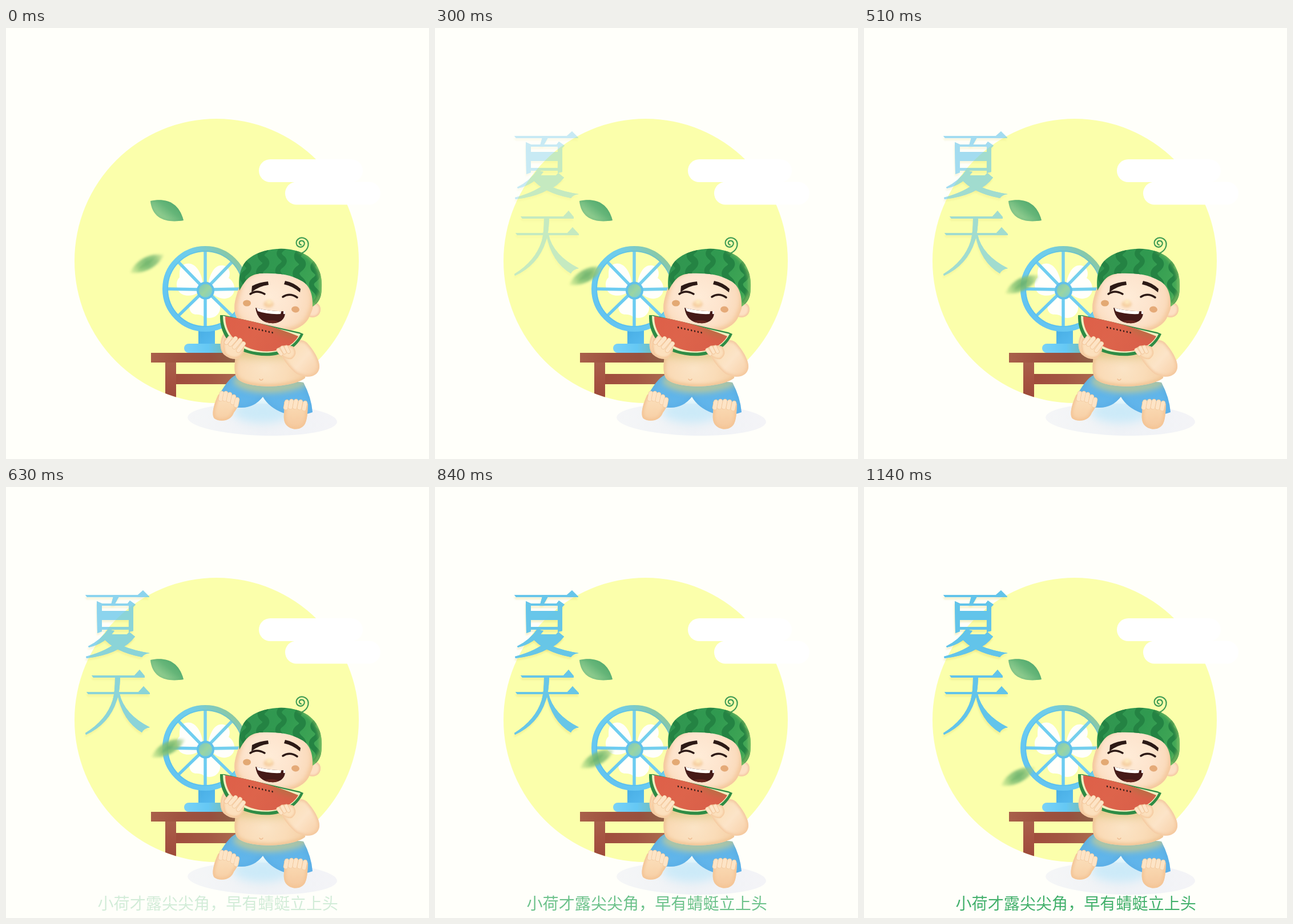
Recreate the animation shown at these times as an HTML page with a canvas. Size 741 px wide and 755 px high, loop 1170 ms.

```html
<!DOCTYPE html>
<html lang="zh-CN">
<head>
<meta charset="utf-8">
<title>夏天</title>
<style>
  html, body { margin: 0; width: 100%; height: 100%; overflow: hidden; background: #fffffa; }
  canvas { display: block; }
</style>
</head>
<body>
<canvas id="stage" width="741" height="755" role="img" aria-label="夏天 小荷才露尖尖角，早有蜻蜓立上头"></canvas>
<script>
const W = 741, H = 755, LOOP = 1170, STEP = 30;
const stage = document.getElementById('stage').getContext('2d');
let c;

function layer(draw) {
  const canvas = document.createElement('canvas');
  canvas.width = W;
  canvas.height = H;
  c = canvas.getContext('2d');
  draw();
  return canvas;
}

function stops(gradient, colors) {
  colors.forEach((color, i) => gradient.addColorStop(i / (colors.length - 1), color));
  return gradient;
}
const linear = (x1, y1, x2, y2, ...colors) => stops(c.createLinearGradient(x1, y1, x2, y2), colors);
const radial = (x, y, r, ...colors) => stops(c.createRadialGradient(x, y, 0, x, y, r), colors);

function fill(d, paint) {
  const path = new Path2D(d);
  c.fillStyle = paint;
  c.fill(path, 'evenodd');
  return path;
}

function line(d, paint, width) {
  c.strokeStyle = paint;
  c.lineWidth = width;
  c.lineCap = c.lineJoin = 'round';
  c.stroke(new Path2D(d));
}

function oval(x, y, rx, ry, paint, turn = 0) {
  c.fillStyle = paint;
  c.beginPath();
  c.ellipse(x, y, rx, ry, turn, 0, Math.PI * 2);
  c.fill();
}

function pill(x, y, w, h, paint) {
  c.fillStyle = paint;
  c.beginPath();
  c.roundRect(x, y, w, h, h / 2);
  c.fill();
}

function ring(x, y, r, width, paint) {
  c.lineWidth = width;
  c.strokeStyle = paint;
  c.beginPath();
  c.arc(x, y, r, 0, Math.PI * 2);
  c.stroke();
}

function inside(path, draw) {
  c.save();
  c.clip(path);
  draw();
  c.restore();
}

function blurred(radius, draw) {
  c.save();
  c.filter = `blur(${radius}px)`;
  draw();
  c.restore();
}

// Fills a shape and shades it softly along its inner edge.
function soft(d, paint, edge, width) {
  const path = fill(d, paint);
  inside(path, () => blurred(width / 3, () => line(d, edge, width)));
  return path;
}

function drawBackdrop() {
  c.fillStyle = '#fffffa';
  c.fillRect(0, 0, W, H);
  oval(369, 408, 249, 249, '#fbffab');
  pill(443, 230, 182, 40, '#fff');
  pill(489, 269.5, 167, 40, '#fff');
}

function drawLeaf() {
  const d = 'M253 303C276 298 302 302 311 337C282 342 256 335 253 303Z';
  soft(d, linear(262, 336, 290, 302, '#a0d392', '#88c88b', '#65b578', '#57ad70'), 'rgba(76,168,108,.25)', 4);
}

function drawTable() {
  const disc = new Path2D();
  disc.arc(369, 408, 249, 0, Math.PI * 2);
  inside(disc, () => {
    fill('M279 585H298V650H279Z', linear(279, 585, 279, 648, '#a9604b', '#a65342', '#9d4a3a'));
    fill('M298 606H412V624H298Z', linear(298, 0, 410, 0, '#a04d3c', '#a35744', '#ad6d4f'));
  });
  fill('M254 569H415V586H254Z', linear(254, 0, 412, 0, '#a9604a', '#9f5240', '#98503e', '#8c6648'));
}

function drawFan() {
  const white = '#fffffb';
  fill('M346 455C344 429 332 409 315 413C301 417 305 430 304 437C295 444 298 465 313 468C325 471 337 466 346 455Z', white);
  fill('M353 455C356 432 365 413 381 416C392 418 394 431 390 438C402 445 404 464 393 471C380 479 364 471 353 455Z', white);
  fill('M344 468C329 471 317 484 323 496C328 505 338 500 344 504C354 512 372 508 375 493C377 479 364 471 355 468Z', white);
  fill('M337 528H366V558H337Z', linear(337, 528, 366, 558, '#48aee5', '#58bcf0'));
  pill(312, 553, 84, 16, linear(312, 0, 396, 0, '#79d2f7', '#65c8f4', '#7cb99f'));

  const blue = linear(300, 500, 400, 390, '#66c8f2', '#72cff0', '#7ccfe3');
  for (let i = 0; i < 8; i++) {
    const angle = i * Math.PI / 4, x = Math.cos(angle), y = Math.sin(angle);
    line(`M${349 + x * 13} ${458 + y * 13}L${349 + x * 67} ${457 + y * 67}`, blue, 5.5);
  }
  ring(349, 457, 70, 10, linear(290, 510, 408, 398, '#62c3f1', '#69cbf2', '#70cde9', '#8fc795'));
  ring(349, 457, 66, 2, 'rgba(70,180,228,.3)');
  oval(349.5, 460, 15.5, 15.5, '#61c1e9');
  oval(349.5, 460, 11.5, 11.5, linear(339, 450, 361, 470, '#7cc8bc', '#9bd5a2', '#7dcfcd'));
}

function drawShadow() {
  oval(449, 686, 131, 28, linear(318, 0, 580, 0, '#f5f6f7', '#eff2f6', '#f4f4f7'), 0.03);
  blurred(8, () => oval(449, 672, 52, 20, 'rgba(190,231,250,.7)'));
}

const SKIN = '#fce0bd', PEACH = '#f4c79b', INK = '#2c1915';

function drawBody() {
  const shorts = 'M404 607C391 613 382 628 371 646Q388 666 413 665Q435 665 450 646Q461 665 485 674Q511 683 537 673Q535 647 521 621Z';
  const cloth = soft(shorts, linear(0, 608, 0, 678, '#6cb9e2', '#60b5ea', '#62b5ec'), 'rgba(77,160,219,.25)', 9);
  inside(cloth, () => blurred(6, () => line('M406 618C430 638 500 634 526 616', 'rgba(196,202,146,.9)', 14)));

  const torso = 'M405 562C399 587 398 608 407 616C428 633 501 631 524 613L528 556Z';
  const path = soft(torso, radial(454, 596, 76, '#fbe4c6', '#fadcb8', '#f5cfa4'), '#f1c697', 8);
  inside(path, () => blurred(8, () => oval(450, 567, 62, 12, 'rgba(212,190,112,.6)')));
  line('M444 615Q447 619 450 615', '#efbd91', 1.5);

  soft('M490 557C506 545 519 544 527 551C540 565 550 583 549 595C546 613 525 614 509 606C495 595 484 579 480 568Z',
    linear(490, 560, 545, 608, '#fadeb5', '#fce4c8', '#f8d0a8'), '#f4c89e', 6);
  soft('M386 529C373 543 373 563 382 572Q393 582 408 579L416 548Z', SKIN, PEACH, 6);
}

function drawFoot(d, toes) {
  soft(d, linear(0, 636, 0, 704, '#fce3c2', '#f9d6ae', '#f5c79c'), '#f4c596', 7);
  toes.forEach(([x, y]) => {
    const toe = `M${x} ${y}l-2 10`;
    line(toe, '#f1c69b', 8.5);
    line(toe, '#fde4c6', 7);
  });
}

function drawFeet() {
  drawFoot('M372 642C365 656 359 677 365 684C377 692 395 687 399 674C407 664 410 653 407 648Z',
    [[378, 640], [385, 640], [392, 642], [399, 646], [405, 651]]);
  drawFoot('M487 655C490 669 483 682 490 694C499 706 518 705 524 693C529 682 528 667 529 658Z',
    [[492, 655], [500, 654], [508, 654], [516, 655], [524, 657]]);
}

function drawFace() {
  soft('M530 483C541 477 552 483 551 494C550 505 539 510 529 505Z', '#fde0c4', '#f5c9a0', 5);
  const head = 'M412 440C407 462 400 474 400 491C401 514 418 526 451 532C495 537 525 526 533 502C545 479 541 440 520 427Q463 401 412 440Z';
  soft(head, radial(462, 472, 85, '#ffecd8', '#fde4cd', '#f9d5b0'), PEACH, 10);

  fill('M430 463L431 452Q444 445 459 444L460 450Q443 452 430 463Z', INK);
  fill('M487 449L489 443Q505 446 516 457L515 463Q502 452 487 449Z', INK);
  line('M428 466Q439 458 453 466', INK, 3.5);
  line('M485 471Q497 463 510 472', INK, 3.5);
  blurred(2, () => {
    oval(460, 484, 9, 6, '#f6cfa2');
    oval(461, 480, 5, 4, '#feeabf');
  });
  blurred(0.7, () => {
    oval(422, 482, 7, 5.5, '#e3a973');
    oval(507, 493, 7, 5.5, '#e5aa78', 0.15);
  });

  const mouth = fill('M437 490Q463 497 489 496Q490 514 471 517Q441 519 437 490Z', '#451a18');
  inside(mouth, () => {
    oval(465, 516, 13, 4, '#652720');
    fill('M438 488Q463 495 483 494L481 501Q458 502 441 496Z', '#fffefa');
    fill('M486 494H491V501H486Z', '#fffefa');
  });
}

function drawCap() {
  const d = 'M409 460C406 434 411 414 428 402C448 387 487 382 514 392C545 403 555 431 553 456C553 472 547 482 537 488C538 469 533 451 518 443C497 430 469 429 444 430C424 433 418 444 409 460Z';
  const cap = fill(d, linear(410, 405, 553, 465, '#319550', '#309a50', '#44a957'));
  inside(cap, () => {
    [[424, 397], [454, 388], [486, 385], [518, 390], [545, 409]].forEach(([x, y], i) => {
      line(`M${x} ${y}q-13 9 -3 17q10 7 -3 16q-9 8 3 18q10 9 1 19`, '#248343', i % 2 ? 12 : 9);
    });
    blurred(3, () => {
      line('M516 389C549 403 556 434 553 465L538 488', 'rgba(150,200,105,.75)', 8);
      line('M409 459C421 432 441 433 470 431', 'rgba(23,99,41,.25)', 4);
    });
  });
  line('M519 394C531 388 533 374 524 369C514 364 505 373 510 381C517 389 528 378 520 373C514 371 511 378 517 380', '#3f9c54', 2.2);
}

function drawSlice() {
  fill('M375 503C374 533 389 557 419 568C464 583 506 571 521 536L514 533L382 503Z', '#2f8c45');
  fill('M380 504C380 532 397 555 426 565C465 575 502 565 516 536Z', '#eff0c0');
  const red = fill('M384 505Q452 515 512 540C499 563 463 573 429 562C398 550 384 532 384 505Z',
    linear(390, 510, 477, 573, '#de6049', '#dd644b', '#d95f49'));
  inside(red, () => blurred(6, () => oval(489, 530, 27, 8, 'rgba(167,119,68,.6)', 0.35)));
  for (let i = 0; i < 8; i++) {
    oval(426 + i * 5.8, 524.5 + i * 1.3, 1.1, 1.7, INK, -0.3);
  }
}

function drawFingers(width, fingers) {
  fingers.forEach(d => {
    line(d, '#f0c296', width);
    line(d, '#fde4c6', width - 1.5);
  });
}

function drawHands() {
  soft('M383 543Q377 558 384 572Q397 583 410 576Q421 566 415 549Z', SKIN, PEACH, 5);
  drawFingers(8, ['M386 551L392 543', 'M393 554L402 544', 'M400 559L410 547', 'M407 565L416 553']);
  soft('M474 563Q486 552 503 558Q513 571 500 580Q486 582 474 563Z', SKIN, PEACH, 4);
  drawFingers(7, ['M477 564L482 571', 'M484 560L488 568', 'M491 559L495 567']);
}

function drawTitle() {
  const strokes = [
    'M139 189H231L240 181L251 192V193H142Z',
    'M188 192H198L190 206H184Z',
    'M159 200L168 204H213L217 199L227 206L223 210V252L215 254V250H168V253L160 256ZM168 208H215V217H168ZM168 233H215V245H168Z',
    'M179 249L190 252Q174 274 145 281L144 279Q166 268 179 249Z',
    'M172 258H212L216 254L226 262Q214 278 199 283Q182 275 172 258Z',
    'M226 262Q196 294 141 300L140 297Q178 287 199 268Z',
    'M172 258Q196 282 252 291Q242 292 238 298Q190 289 169 263Z',
    'M150 330H225L234 320L243 331V334H153Z',
    'M141 359H232L241 349L252 361V363H144Z',
    'M191 333H200Q199 362 194 374Q181 415 140 434L139 431Q176 408 187 373Q191 359 191 333Z',
    'M195 362H199Q207 398 252 421Q241 423 238 430Q204 410 195 362Z'
  ];
  c.save();
  c.shadowColor = 'rgba(222,210,98,.3)';
  c.shadowOffsetX = -1;
  c.shadowOffsetY = 4;
  c.shadowBlur = 3;
  strokes.forEach(d => fill(d, '#62c4ea'));
  c.restore();
  strokes.forEach(d => fill(d, '#62c4ea'));
}

function drawPoem() {
  c.font = '28.1px "Noto Sans CJK SC", "Noto Sans CJK", sans-serif';
  c.fillStyle = '#42b06b';
  c.fillText('小荷才露尖尖角，早有蜻蜓立上头', 160.5, 740);
}

function drawDriftingLeaf() {
  const paint = linear(-31, 0, 33, 0, 'rgba(165,212,128,.4)', '#94cb7c', '#78bb74', '#8fc57d', 'rgba(168,208,138,.35)');
  c.translate(100, 100);
  c.rotate(-0.43);
  blurred(2.3, () => fill('M-33 2C-17 -14 13 -16 33 -2C16 13 -13 14 -33 2Z', paint));
  blurred(1.5, () => fill('M-17 2Q1 -8 14 -3Q4 6 -17 2Z', 'rgba(80,162,90,.3)'));
}

const scene = layer(() => {
  [drawBackdrop, drawLeaf, drawTable, drawFan, drawShadow, drawBody,
    drawFeet, drawFace, drawCap, drawSlice, drawHands].forEach(draw => draw());
});
const title = layer(drawTitle);
const poem = layer(drawPoem);
const drifting = layer(drawDriftingLeaf);

const fade = (t, from, to) => Math.min(1, Math.max(0, (t - from) / (to - from)));

function show(image, alpha, x = 0, y = 0) {
  stage.globalAlpha = alpha;
  stage.drawImage(image, x, y);
}

function render(now) {
  const t = Math.floor(now % LOOP / STEP) * STEP;
  const turn = 720, after = Math.max(0, t - turn), before = Math.min(t, turn);
  const x = 247 + before * 0.059 - after * 0.047;
  const y = 413 + before * 0.071 + after * 0.103;
  show(scene, 1);
  show(title, fade(t, 0, 870));
  show(poem, fade(t, 540, 930));
  show(drifting, 0.92, x - 100, y - 100);
}

const start = performance.now();
function tick() {
  render(performance.now() - start);
  requestAnimationFrame(tick);
}
tick();
</script>
</body>
</html>
```
